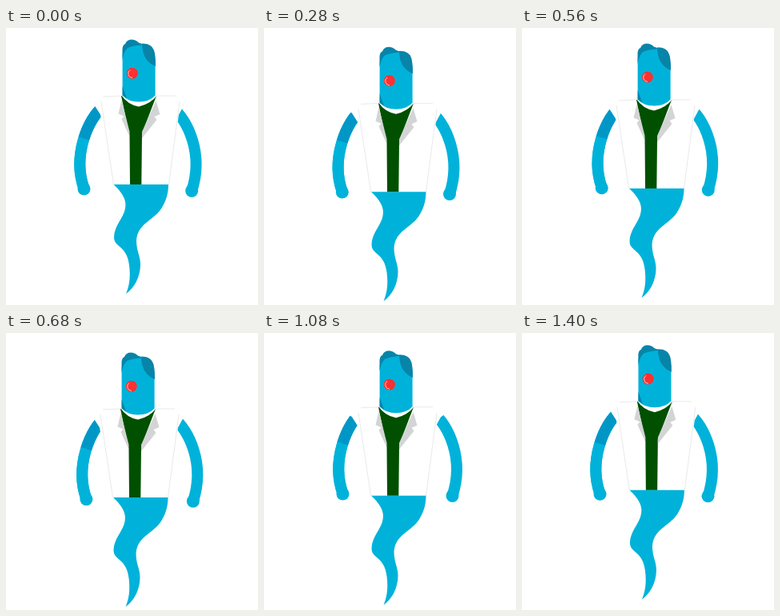
Recreate the animation shown at these times as an HTML page. Size 315 px wide and 347 px high, loop 1480 ms.

```html
<!DOCTYPE html>
<html lang="en">
<head>
<meta charset="utf-8">
<title>Floating ghost</title>
<style>
  html, body { margin: 0; width: 100%; height: 100%; overflow: hidden; background: #fff; }
  svg { display: block; width: 100%; height: 100%; }
</style>
</head>
<body>
<svg viewBox="0 0 315 347">
  <g id="left" fill="none" stroke-width="14">
    <path id="sleeve" stroke="#00b2d9" d="M122 98C102 114 83 160 97.500 201"/>
    <use href="#sleeve"/>
    <path stroke="#0097c7" stroke-dasharray="48 200" d="M122 98C102 114 83 160 97.500 201"/>
    <circle cx="97.500" cy="201.500" r="8" fill="#00b2d9"/>
  </g>
  <g id="right" fill="none" stroke-width="14">
    <path stroke="#00b2d9" d="M206 98C228 116 247 158 232 204"/>
    <circle cx="232" cy="204" r="8" fill="#00b2d9"/>
  </g>
  <path id="tail" fill="#00b2d9" d="M133.500 195C142 203 152 214 149 226C147 238 135 248 135 262C135 275 151 272 154 297C156 313 154 323 150 333C160 326 168 312 168 296C168 285 163 280 163 266C165 243 187 241 196 223C201 214 203 206 203 195Z"/>
  <g id="body">
    <path fill="#fff" d="M144 76H112L104 92L111 97.500L118 108.500L134 196H203.500L216 108.500L222 97.500L230 92L222 76Z"/>
    <path fill="none" stroke="#dde0e0" stroke-width=".7" d="M144 85L122 86M119 92L134.500 196M188 85H212M217 92L203.500 196"/>
    <path fill="#005000" d="M144 85H188L170 132L169.300 196H155L154.500 136Z"/>
    <path fill="#d3d5d5" d="M144.500 90L140.500 107.500L147.500 110.500L144.500 114L154.500 136V130ZM187.500 91L192.500 108L185.500 111L188.500 115L170 138V130Z"/>
    <path fill="#fff" d="M144 84Q152 96 166 98.500Q181 95 189 84V76H144Z"/>
    <path fill="#00b2d9" d="M145.600 34Q147 21 160 19Q185 19 186.600 40V84.500Q179 92.500 166 92.500Q153 92.500 145.600 84.500Z"/>
    <path fill="#0884a9" d="M145.500 40V26Q146 21 149 20Q151 14.500 157 14.500Q162 14.500 166 18.500Q170 19.500 172 21Q158 22 152 25Q147 30 145.500 40ZM170 19.500Q182 19 185 28Q187 33 187 48Q179 45 174 37Q170 29 170 19.500ZM145.600 73V84.500L151 88Z"/>
    <circle cx="157.800" cy="56.700" r="7" fill="#ff3030"/>
    <path fill="none" stroke="#fff" stroke-width=".7" d="M158 62.500A5.500 5.500 0 0 1 155 52.500"/>
  </g>
</svg>
<script>
  const STEP = 40, LOOP = 1480, HALF_BOB = 240;
  // Turning points of three bobs
  const bodyTurns = [0, 9.8, 3, 10.5, 4, 11.5, 0];
  const armTurns = [0, 4.6, -4, 7.5, -4.5, 4.5, 0];

  function bob(turns, t) {
    const i = Math.floor(t / HALF_BOB), u = t / HALF_BOB - i;
    return turns[i] + (turns[i + 1] - turns[i]) * (1 - Math.cos(Math.PI * u)) / 2;
  }

  // One slow sideways swing per loop
  const swing = (size, t) => size * Math.sin(Math.PI * t / LOOP) ** 4;

  function move(id, x, y) {
    document.getElementById(id).setAttribute('transform', `translate(${x} ${y})`);
  }

  function draw(now) {
    const t = Math.min(Math.floor(now % LOOP / STEP) * STEP, LOOP - 2 * STEP);
    const drop = bob(bodyTurns, t), armDrop = bob(armTurns, t);
    const lean = -Math.min(drop / 5, 1);
    move('body', lean, drop);
    move('tail', lean / 2, drop);
    move('left', swing(3, t), armDrop);
    move('right', swing(4, t - 220), armDrop);
    requestAnimationFrame(draw);
  }
  draw(performance.now());
</script>
</body>
</html>
```
